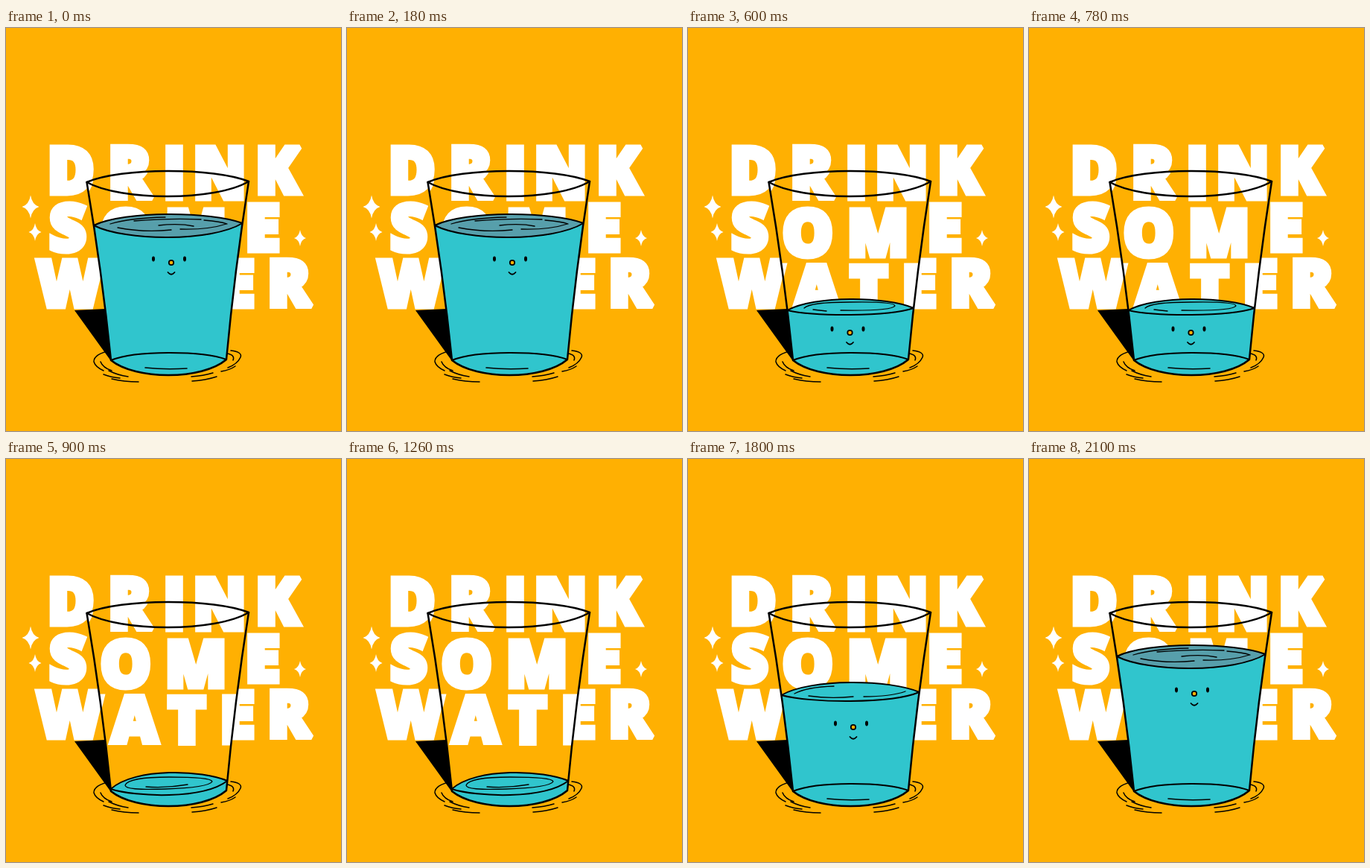
These frames come from a looping animation (450x541 px, 2400 ms). An HTML page with a canvas:

```html
<!DOCTYPE html>
<html lang="en">
<head>
<meta charset="utf-8">
<title>Drink some water</title>
<style>
  html, body { margin: 0; width: 100%; height: 100%; overflow: hidden; background: #ffb002; }
  canvas { display: block; width: 450px; height: 541px; }
</style>
</head>
<body>
<canvas id="stage" width="450" height="541" role="img" aria-label="Drink some water"></canvas>
<script>
const ctx = document.getElementById('stage').getContext('2d');
const BG = '#ffb002', INK = '#000', WATER = '#30c5cd', DEEP = '#579fab';
const STEP = 300;
const ORDER = [0, 1, 2, 3, 3, 2, 1, 0];
const WEIGHT = 7;

// Each row: bottom edge, then letters with the centre of their ink.
const ROWS = [
  [225, { D: 88, R: 170, I: 226, N: 287, K: 368 }],
  [302, { S: 83, O: 161, M: 255, E: 346 }],
  [377, { W: 86, A: 173, T: 243, E: 312, R: 384 }]
];

const RIM = { x0: 108.5, y0: 207, x1: 326, y1: 206, top: 192, low: 226 };
const BASE = { x0: 141, y0: 446, x1: 296, y1: 445, top: 436, low: 466 };
const BOW = 4;

const LEVELS = [
  { y0: 265, y1: 262, top: 250, low: 281, fill: DEEP, face: [222, 315],
    marks: ['M140 263Q166 255 214 254', 'M150 268Q186 275 222 271', 'M172 259Q220 255 262 257',
            'M205 265Q232 262 252 266', 'M234 270Q272 271 296 263', 'M266 258Q289 260 297 263'] },
  { y0: 317, y1: 313, top: 300, low: 325, fill: WATER, face: [222, 360],
    marks: ['M143 315Q160 306 196 305', 'M162 318Q190 322 222 319', 'M236 319Q272 319 292 312'] },
  { y0: 379, y1: 376, top: 364, low: 385, fill: WATER, face: [217.5, 409],
    marks: ['M156 376Q164 368 217 368Q277 367 278 373Q274 380 205 379', 'M168 378L186 380'] },
  { y0: 443, y1: 432, top: 421, low: 451, fill: WATER,
    marks: ['M160 438Q164 427 219 427Q276 427 277 433Q272 441 214 443Q160 445 160 438',
            'M188 440Q216 442 244 437'] }
];

const GROUND = [
  'M142 433Q118 437 118 448Q120 455 131 460', 'M127 448Q130 456 142 460',
  'M131 465Q141 469 153 470', 'M138 460Q150 466 164 468', 'M142 471Q158 475 178 475',
  'M302 433Q318 435 315 442Q311 451 298 456', 'M297 437Q308 439 305 446',
  'M289 461Q301 459 308 454', 'M249 468Q265 467 278 463', 'M250 474Q268 473 283 468'
];

function stroke(path, width = 2.2) {
  ctx.strokeStyle = INK;
  ctx.lineWidth = width;
  ctx.stroke(path);
}

function fill(path, color) {
  ctx.fillStyle = color;
  ctx.fill(path);
}

// Adds a soft arc that reaches the height y between two points.
function arc(path, xa, ya, xb, yb, y) {
  const k = (xb - xa) * 0.21;
  const lift = end => (y - end / 4) / 0.75;
  path.bezierCurveTo(xa + k, lift(ya), xb - k, lift(yb), xb, yb);
}

function curve(s, y) {
  const p = new Path2D();
  p.moveTo(s.x0, s.y0);
  arc(p, s.x0, s.y0, s.x1, s.y1, y);
  return p;
}

function lens(s) {
  const p = curve(s, s.top);
  arc(p, s.x1, s.y1, s.x0, s.y0, s.low);
  p.closePath();
  return p;
}

// Region from the back edge of a level down to the front of the base.
function body(s, bow = 0) {
  const p = curve(s, s.top);
  const mid = (s.y0 + BASE.y0) / 2;
  p.quadraticCurveTo((s.x1 + BASE.x1) / 2 - bow, mid, BASE.x1, BASE.y1);
  arc(p, BASE.x1, BASE.y1, BASE.x0, BASE.y0, BASE.low);
  p.quadraticCurveTo((s.x0 + BASE.x0) / 2 + bow, mid, s.x0, s.y0);
  p.closePath();
  return p;
}

// Where the bowed wall on the given side stands at height y.
function wall(side, y) {
  const a = RIM['x' + side], b = BASE['x' + side];
  const t = (y - RIM.y0) / (BASE.y0 - RIM.y0);
  return a + (b - a) * t + (side ? -1 : 1) * 2 * t * (1 - t) * BOW;
}

function lettering(dy) {
  ctx.font = '800 86px "Open Sans", sans-serif';
  ctx.textAlign = 'left';
  ctx.fillStyle = ctx.strokeStyle = '#fff';
  ctx.lineWidth = WEIGHT;
  ctx.lineJoin = 'miter';
  ctx.miterLimit = 2;
  for (const [bottom, letters] of ROWS) {
    const y = bottom - WEIGHT / 2 + dy;
    for (const [ch, mid] of Object.entries(letters)) {
      const m = ctx.measureText(ch);
      const x = mid - (m.actualBoundingBoxRight - m.actualBoundingBoxLeft) / 2;
      ctx.fillText(ch, x, y);
      ctx.strokeText(ch, x, y);
    }
  }
  ctx.lineJoin = 'round';
}

function sparkle(x, y, w, h) {
  const p = new Path2D();
  const c = 0.18;
  p.moveTo(x, y - h);
  p.quadraticCurveTo(x + w * c, y - h * c, x + w, y);
  p.quadraticCurveTo(x + w * c, y + h * c, x, y + h);
  p.quadraticCurveTo(x - w * c, y + h * c, x - w, y);
  p.quadraticCurveTo(x - w * c, y - h * c, x, y - h);
  fill(p, '#fff');
}

function face([x, y]) {
  for (const side of [-1, 1]) {
    const eye = new Path2D();
    eye.ellipse(x - 3 + side * 21, y - 5, 2, 3.4, 0, 0, Math.PI * 2);
    fill(eye, INK);
  }
  const nose = new Path2D();
  nose.arc(x, y, 3.2, 0, Math.PI * 2);
  fill(nose, BG);
  stroke(nose, 1.8);
  stroke(new Path2D(`M${x - 4.5} ${y + 13}q4.5 5.5 9 0`), 1.8);
}

function water(level) {
  const s = { ...level, x0: wall(0, level.y0), x1: wall(1, level.y1) };
  const top = lens(s);
  fill(body(s), WATER);
  fill(top, s.fill);
  stroke(top, 2);
  s.marks.forEach(d => stroke(new Path2D(d), 1.3));
  if (!s.face) return;
  stroke(curve(BASE, BASE.top));
  stroke(new Path2D('M187 456Q214 459 243 457'), 1.6);
  face(s.face);
}

function draw(level) {
  ctx.fillStyle = BG;
  ctx.fillRect(0, 0, 450, 541);
  ctx.lineCap = ctx.lineJoin = 'round';

  lettering(0);
  sparkle(33, 240, 11.5, 15.5);
  sparkle(39, 274, 8.5, 12);
  sparkle(395, 282, 8, 11);

  fill(new Path2D('M92 379L134 377L141 447Z'), INK);
  GROUND.forEach(d => stroke(new Path2D(d), 1.5));

  // The glass bends what is behind it slightly downwards.
  const glass = body(RIM, BOW);
  ctx.save();
  ctx.clip(glass);
  ctx.fillStyle = BG;
  ctx.fillRect(100, 185, 235, 290);
  lettering(7);
  water(LEVELS[level]);
  ctx.restore();

  stroke(glass, 2.5);
  stroke(curve(RIM, RIM.low), 2.5);
}

function frame() {
  draw(ORDER[Math.floor(performance.now() / STEP) % ORDER.length]);
  requestAnimationFrame(frame);
}
frame();
</script>
</body>
</html>
```
